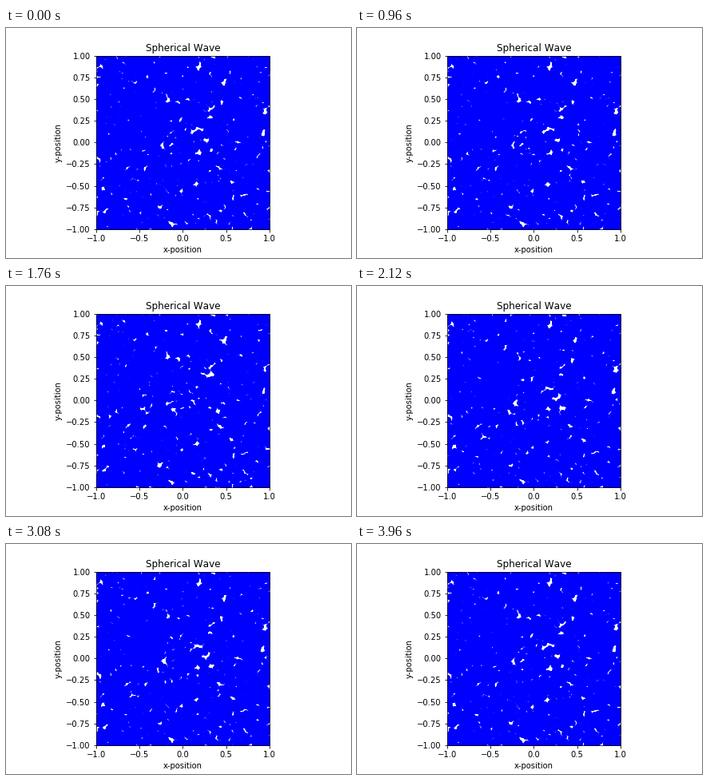
These frames come from a looping animation (432x288 px, 4 s). A matplotlib script:

```python
import numpy as np
import matplotlib.pyplot as plt
from matplotlib.animation import FuncAnimation

FRAMES, STEP = 100, 40
CYCLES = 4             # wave periods in one loop
COUNT = 5000           # particles
AMP, K = 0.008, 17.0   # wave strength and wavenumber

plt.rcParams["text.kerning_factor"] = 6

rng = np.random.default_rng(5)
rest = rng.uniform(-1, 1, (2, COUNT))
radius = np.hypot(*rest)
outward = rest / radius


def displaced(phase):
    """Outgoing radial wave whose amplitude falls off as 1/r."""
    shift = AMP / radius * np.sin(2 * np.pi * phase - K * radius)
    return rest + outward * shift


fig, ax = plt.subplots(figsize=(6, 4), dpi=72)
fig.subplots_adjust(left=0.125, right=0.9, bottom=0.125, top=0.88)
ax.set_aspect("equal")
ax.set(xlim=(-1, 1), ylim=(-1, 1), title="Spherical Wave",
       xlabel="x-position", ylabel="y-position",
       xticks=np.linspace(-1, 1, 5), yticks=np.linspace(-1, 1, 9))
dots, = ax.plot([], [], "bo")


def update(i):
    # The last frame repeats the first pose.
    dots.set_data(*displaced(CYCLES * i / (FRAMES - 1)))
    return dots,


anim = FuncAnimation(fig, update, frames=FRAMES, interval=STEP,
                     repeat=True, repeat_delay=0)
plt.show()
```
